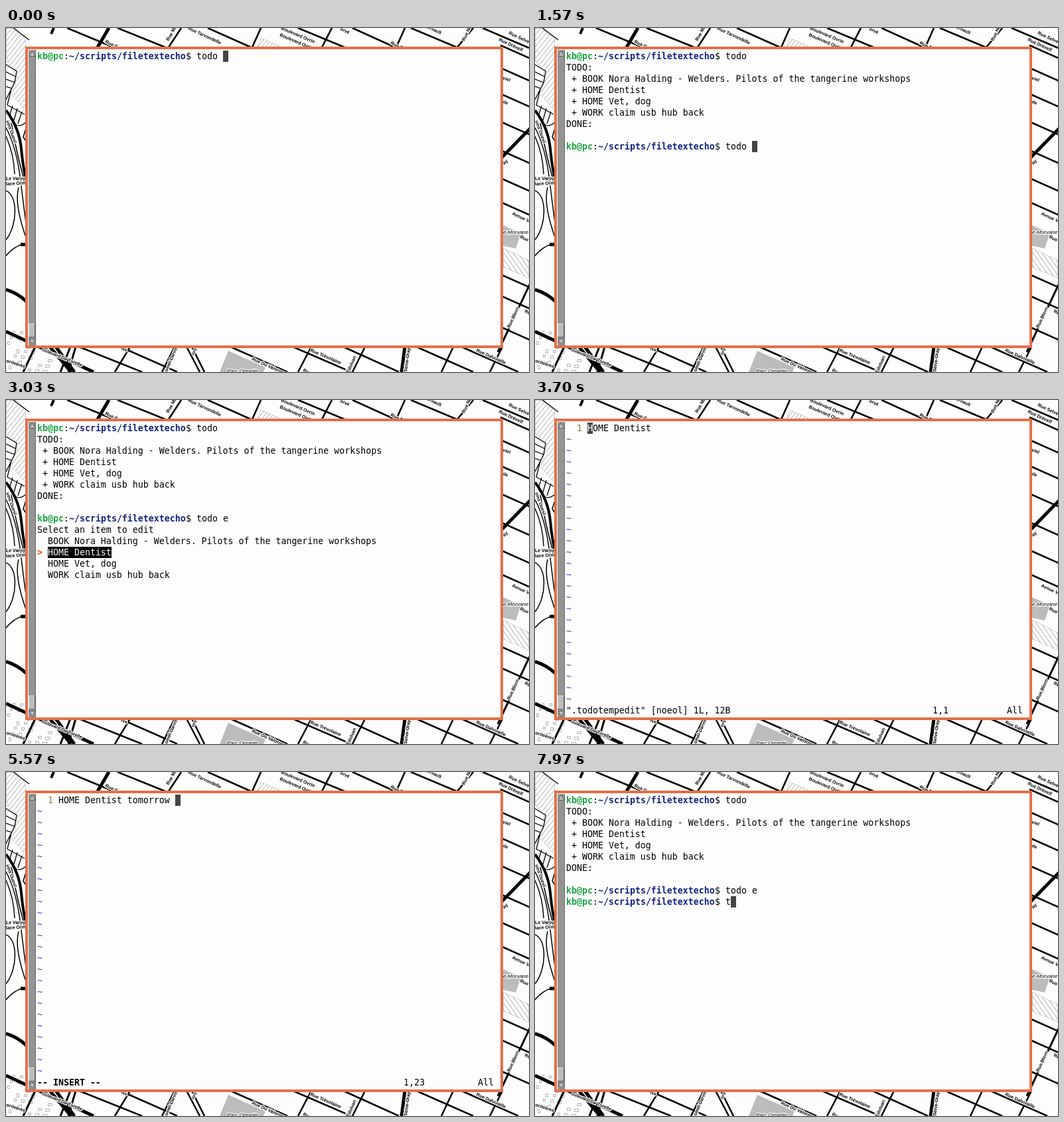
An HTML page with a canvas for the animation above (8000 ms loop, 788x518 px).

```html
<!DOCTYPE html>
<html lang="en">
<head>
<meta charset="utf-8">
<title>Todo terminal</title>
<style>
  html, body { margin: 0; width: 100%; height: 100%; overflow: hidden; background: #fdfdfd; }
  canvas { display: block; }
</style>
</head>
<body>
<canvas id="stage" width="788" height="518"></canvas>
<script>
const g = document.getElementById('stage').getContext('2d');
const PAPER = '#fdfdfd', INK = '#000', CURSOR = '#444';
const GREEN = '#1fa544', BLUE = '#14247c', RED = '#e0481e', BROWN = '#a07038', TILDE = '#4a44c0';
const LOOP = 8000;

// ---------- street map ----------
function road(path, width) {
  g.lineJoin = 'round';
  g.strokeStyle = INK;
  g.lineWidth = width;
  g.stroke(new Path2D(path));
}

function hatch(path, step, lean) {
  const shape = new Path2D(path);
  g.save();
  g.clip(shape);
  g.strokeStyle = '#a8a8a8';
  g.lineWidth = 1;
  g.beginPath();
  for (let x = -600; x < 1400; x += step) {
    g.moveTo(x, 0);
    g.lineTo(x + lean * 518, 518);
  }
  g.stroke();
  g.stroke(shape);
  g.restore();
}

function park(path) {
  g.fillStyle = '#bcbcbc';
  g.fill(new Path2D(path));
}

function label(text, x, y, degrees, style = 'bold 7px') {
  g.save();
  g.translate(x, y);
  g.rotate(degrees * Math.PI / 180);
  g.font = style + ' "Liberation Sans", Arial, sans-serif';
  g.strokeStyle = PAPER;
  g.lineWidth = 2.5;
  g.strokeText(text, 0, 0);
  g.fillStyle = INK;
  g.fillText(text, 0, 0);
  g.restore();
}

function houses() {
  g.strokeStyle = '#b4b4b4';
  g.lineWidth = 1;
  for (let i = 0; i < 34; i++) {
    const x = (i * 17) % 66, y = 436 + (i * 29) % 80;
    if (y > 446 + x * 0.5) g.strokeRect(x + .5, y + .5, 3 + i % 4, 3 + i % 3);
  }
}

function drawMap() {
  g.fillStyle = PAPER;
  g.fillRect(0, 0, 788, 518);

  hatch('M0 0H14L30 17V125L8 100 18 66 0 50Z', 7, -.8);
  hatch('M384 15L412 27 408 30H378Z', 6, -.8);
  hatch('M749 331L788 350V377L749 360Z', 7, .7);
  park('M749 297L776 309 768 332 749 328Z');
  park('M335 486L391 511 388 518H322Z');
  houses();

  // Left edge: sheds, ramps and the expressway
  road('M0 55L16 65 13 82 0 108M0 66L14 73M0 77L13 82M0 88L9 91M8 92L2 116 28 130M10 117L5 133M17 121L12 139M24 126L18 144M5 133Q15 155 30 142M11 0L35 18', 1.3);
  road('M0 150Q16 180 22 230T31 300M8 143Q18 200 31 240M0 163Q12 190 13 220M19 240Q12 265 31 318M0 245C18 252 18 296 0 319M31 148L26 164 31 172', 1.5);
  road('M0 124Q20 150 23 182T32 235', 4);
  road('M22 326H31M0 394Q17 399 31 412', 5);
  road('M0 343Q12 329 24 326', 1.5);

  // Top edge
  road('M72 0L68 9', 4);
  road('M155 0L138 29', 5);
  road('M92 0L162 29M168 0L240 29M264 0L245 29M304 0L369 29M384 0L371 29M440 0L510 29M491 0L476 29M522 0L586 29M601 0L588 29M610 0L679 29M704 0L680 29M718 0L788 30', 2.6);

  // Right edge: evenly slanted streets
  for (const y of [28, 62, 101, 143, 186, 228, 264, 373, 405, 452]) road(`M745 ${y - 2}L790 ${y + 18}`, 2.6);
  road('M745 197L790 151', 5);
  road('M790 384L741 488', 3);

  // Bottom edge
  road('M0 457L132 518M66 480L98 518M75 480L103 518', 5);
  road('M44 480L26 518M105 480L94 518M97 480L82 518', 3);
  road('M110 480L205 518M187 480L164 518M172 480L258 518M254 480L235 518M272 480L292 518M280 480L299 518M338 480L424 518M460 480L440 518M432 480L520 518M541 480L522 518M508 480L592 518M618 480L704 518M674 480L656 518M686 480L772 518M748 480L729 518', 2.5);
  road('M601 480L596 518', 5);

  const labels = [
    ['Rue Gorvel', 149, 22, 25], ['Rue Mivel', 245, 20, -60], ['Rue Tarvondelle', 274, 2, 25],
    ['Boulevard Ovrin', 414, 2, 23], ['Boulevard Ovrin', 412, 12, 23], ['orvé', 503, 3, 25],
    ['Rue Dalvène', 579, 24, 25], ['ervault', 634, 0, 25], ['Rue Nelvic', 691, 20, -65],
    ['Rue Selve-Arn', 757, 9, 25], ['Rue Drévelf', 742, 19, 25],
    ['viel', 748, 77, 20], ['ule', 746, 112, 20], ['ay', 751, 206, -45],
    ['Avnue Velor', 762, 281, 25], ['Rue Varnel', 774, 316, 25], ['Rue Orvel', 781, 428, 25],
    ['Rue Blorn', 759, 452, -65], ['vins Ouest', 0, 140, 70],
    ['Le Varoy', 0, 229, 0], ['lace Ormel', 0, 237, -3],
    ['oulevard Da Torelle', 54, 486, 22], ['ormières', 0, 503, 18], ['lve', 173, 484, 22],
    ['omel-Darvoni', 243, 518, -67], ['ors', 283, 493, -65],
    ['Rue Du Valornec', 370, 500, 24], ['Rue Trévolaine', 458, 487, 23], ['Rue Sorvel', 447, 517, 23],
    ['Édolvan', 517, 520, -67], ['Selve-Oray', 604, 518, -82], ['Rue Dalvinelle', 708, 487, 24]
  ];
  labels.forEach(entry => label(...entry));
  label('e-Morvane', 749, 310, 0, 'italic 8px');
  label('Parc Ormelin', 333, 519, 0, 'italic 8px');
}

// ---------- window ----------
function bevel(x, y, w, h) {
  g.fillStyle = '#bcbcbc';
  g.fillRect(x, y, w, h);
  g.fillStyle = '#e4e4e4';
  g.fillRect(x, y, w, 1);
  g.fillRect(x, y, 1, h);
  g.fillStyle = '#606060';
  g.fillRect(x, y + h - 1, w, 1);
  g.fillRect(x + w - 1, y, 1, h);
}

function arrow(baseY, tipY) {
  g.beginPath();
  g.moveTo(35, baseY);
  g.lineTo(44, baseY);
  g.lineTo(39.5, tipY);
  g.closePath();
  g.fillStyle = '#bcbcbc';
  g.fill();
  g.strokeStyle = '#606060';
  g.lineWidth = 1;
  g.stroke();
}

function drawWindow() {
  g.fillStyle = '#e27049';
  g.fillRect(29, 28, 720, 454);
  g.fillStyle = PAPER;
  g.fillRect(33, 32, 712, 446);
  g.fillStyle = '#949494';
  g.fillRect(34, 33, 11, 445);
  g.fillStyle = '#666';
  g.fillRect(44, 33, 1, 445);
  arrow(42.5, 34);
  arrow(468.5, 477);
  bevel(34, 445, 10, 21);
}

// ---------- terminal ----------
const CELL = 8, ROW = 17, LEFT = 47, TOP = 34;

function put(col, row, text, color = INK, weight = '') {
  g.font = weight + ' 13.288px "DejaVu Sans Mono", monospace';
  g.fillStyle = color;
  g.fillText(text, LEFT + col * CELL, TOP + row * ROW + 13);
}

function block(col, row, cells = 1, color = CURSOR) {
  g.fillStyle = color;
  g.fillRect(LEFT + col * CELL, TOP + row * ROW, cells * CELL, ROW);
}

function prompt(row, command, active) {
  put(0, row, 'kb@pc', GREEN, 'bold');
  put(5, row, ':');
  put(6, row, '~/scripts/filetextecho', BLUE, 'bold');
  put(28, row, '$ ' + command);
  if (active) block(30 + command.length, row);
}

const typed = (text, start, step, t) =>
  text.slice(0, Math.max(0, Math.floor((t - start) / step) + 1));

const ITEMS = [
  'BOOK Nora Halding - Welders. Pilots of the tangerine workshops',
  'HOME Dentist', 'HOME Vet, dog', 'WORK claim usb hub back'
];
const AT = { list: 400, menu: 1950, down: 2750, open: 3150, insert: 4150, escape: 7000, colon: 7120, quit: 7580 };

function drawShell(t) {
  prompt(0, 'todo ', t < AT.list);
  if (t < AT.list) return;
  put(0, 1, 'TODO:');
  ITEMS.forEach((item, i) => put(1, 2 + i, '+ ' + item));
  put(0, 6, 'DONE:');
  prompt(8, typed('todo e', 1000, 130, t), t < AT.menu);
  if (t >= AT.quit) prompt(9, typed('t', 7900, 130, t), true);
  else if (t >= AT.menu) drawMenu(t < AT.down ? 0 : 1);
}

function drawMenu(selected) {
  put(0, 9, 'Select an item to edit');
  ITEMS.forEach((item, i) => {
    const row = 10 + i, chosen = i === selected;
    if (chosen) {
      put(0, row, '>', RED, 'bold');
      block(2, row, item.length, '#000');
    }
    put(2, row, item, chosen ? PAPER : INK);
  });
}

function drawEditor(t) {
  const text = ITEMS[1] + typed(' tomorrow ', 4350, 125, t) +
    typed('at ', 5950, 200, t) + typed('10', 6720, 130, t);
  const inserting = t >= AT.insert && t < AT.escape;
  const commanding = t >= AT.colon;
  const cursor = t < AT.insert ? 0 : text.length - (inserting ? 0 : 1);

  put(2, 0, '1', BROWN);
  put(4, 0, text);
  for (let row = 1; row < 25; row++) put(0, row, '~', TILDE);

  if (commanding) {
    const command = typed(':wq', AT.colon, 120, t);
    put(0, 25, command);
    block(command.length, 25);
    return;
  }
  block(4 + cursor, 0);
  if (cursor < text.length) put(4 + cursor, 0, text[cursor], PAPER);
  if (inserting) put(0, 25, '-- INSERT --', INK, 'bold');
  else if (t < AT.insert) put(0, 25, '".todotempedit" [noeol] 1L, 12B');
  put(69, 25, '1,' + (cursor + 1));
  put(83, 25, 'All');
}

function frame(now) {
  const t = now % LOOP;
  g.fillStyle = PAPER;
  g.fillRect(45, 32, 700, 446);
  if (t >= AT.open && t < AT.quit) drawEditor(t);
  else drawShell(t);
  requestAnimationFrame(frame);
}

drawMap();
drawWindow();
requestAnimationFrame(frame);
</script>
</body>
</html>
```
